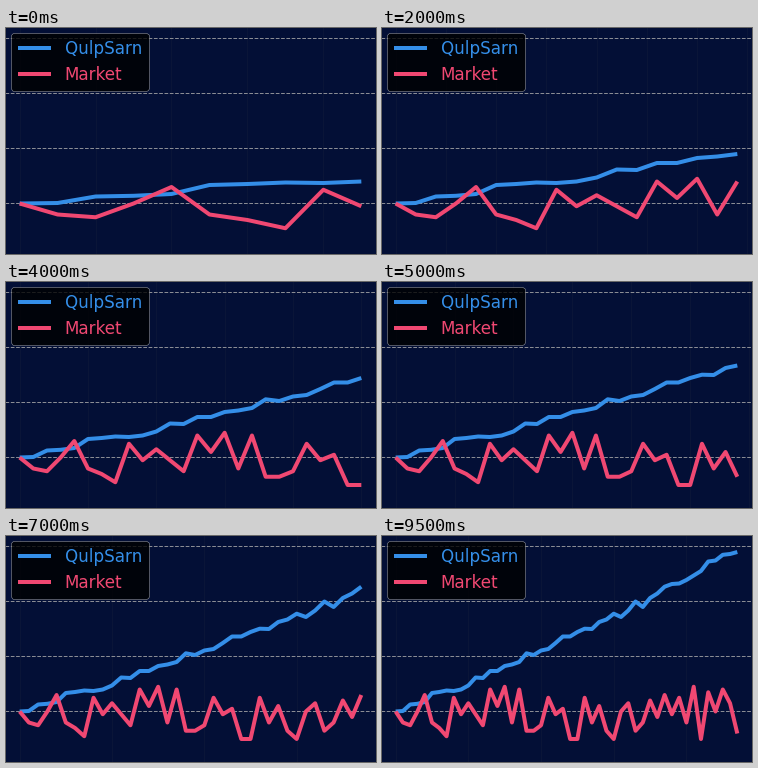
Recreate the animation shown at these times as a matplotlib script. Size 370x226 px, loop 10000 ms.

```python
import numpy as np
import matplotlib.pyplot as plt
from matplotlib.animation import FuncAnimation
from matplotlib.ticker import MaxNLocator

WIDTH, HEIGHT, DPI = 370, 226, 72
FRAMES, INTERVAL = 20, 500
START, STEP = 10, 2          # points shown at first, points added per frame

NAVY, BLUE, PINK = "#030f36", "#348ee8", "#f04872"
GRID_GREY, FAINT = "#8a8c94", "#0a1538"

# Axes box in pixels, slightly larger than the stage
LEFT, TOP, BOX_W, BOX_H = -3.44, -3.44, 375.84, 233.28
BASE_Y, UNIT = 175.5, 55     # pixel row of value 0, pixels per unit

fund = np.array([
    0, .5, 7, 7.7, 9.5, 18.5, 19.5, 21, 20.5, 22, 26, 34, 33.5, 40.5, 40.5,
    45.5, 47, 49.5, 58.2, 56.5, 61, 62.5, 68.5, 75, 75, 79.5, 82.8, 82.5,
    89.5, 92, 97.8, 94.5, 101, 110, 104.5, 113.5, 118, 124.8, 127.5, 128,
    131.5, 136, 140.5, 150, 151, 156.7, 157.5, 159.5]) / UNIT
market = np.array([
    0, -4, -5, 0, 6, -4, -6, -9, 5, -1, 3, -1, -5, 8, 2, 9, -4, 8, -7, -7,
    -5, 5, -1, 1, -10, -10, 5, -4, 2, -7, -10, 0, 3, -7, -4, 4, -2, 6, -1,
    5, -4, 9, -10, 7, 0, 8, 3, -8]) * 0.05

plt.rcParams["font.family"] = "DejaVu Sans"
fig = plt.figure(figsize=((WIDTH + 1e-6) / DPI, (HEIGHT + 1e-6) / DPI),
                 dpi=DPI, facecolor=NAVY)
ax = fig.add_axes([LEFT / WIDTH, 1 - (TOP + BOX_H) / HEIGHT,
                   BOX_W / WIDTH, BOX_H / HEIGHT], facecolor=NAVY)
ax.set_ylim((BASE_Y - TOP - BOX_H) / UNIT, (BASE_Y - TOP) / UNIT)
ax.spines[:].set_visible(False)
ax.tick_params(length=0, labelbottom=False, labelleft=False)
ax.set_axisbelow(True)
ax.set_yticks(range(4))
ax.xaxis.set_major_locator(MaxNLocator(8, steps=[1, 2, 2.5, 5, 10]))
ax.grid(axis="x", color=FAINT, lw=1)
ax.grid(axis="y", color=GRID_GREY, lw=1, ls="--")

style = dict(lw=4, solid_capstyle="butt")
fund_line, = ax.plot([], [], color=BLUE, label="QulpSarn", **style)
market_line, = ax.plot([], [], color=PINK, label="Market", **style)

legend = ax.legend(loc="upper left", fontsize=16.8, labelcolor="linecolor",
                   facecolor="black", edgecolor="0.8", framealpha=0.8)
legend.get_frame().set_linewidth(0.5)


def update(frame):
    count = START + STEP * frame
    last = count - 1
    x = np.arange(count)
    fund_line.set_data(x, fund[:count])
    market_line.set_data(x, market[:count])
    ax.set_xlim(-0.05 * last, 1.05 * last)
    return fund_line, market_line


anim = FuncAnimation(fig, update, frames=FRAMES, interval=INTERVAL,
                     repeat=True, repeat_delay=0)
plt.show()
```
